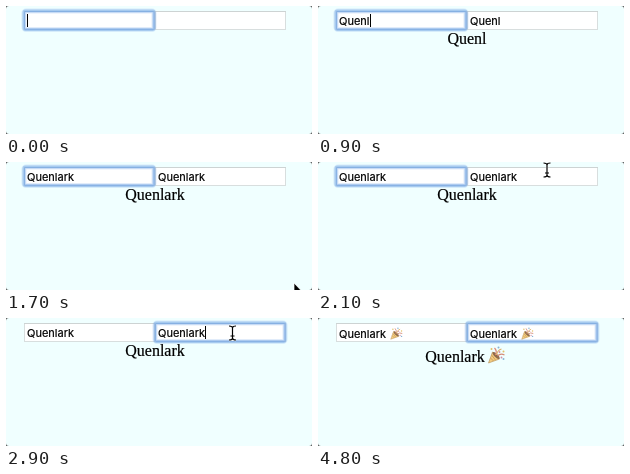
An HTML page for the animation above (5 s loop, 306x128 px).

```html
<!DOCTYPE html>
<html lang="en">
<head>
<meta charset="utf-8">
<title>Linked inputs</title>
<style>
  html, body { margin: 0; width: 100%; height: 100%; overflow: hidden; background: #555; }
  svg { display: block; }
  text { white-space: pre; fill: #000; stroke: #000; stroke-width: .2; }
  .value { font: 11px Inter, "Open Sans", sans-serif; }
  .title { font: 16px "Liberation Serif", "Noto Serif", serif; text-anchor: middle; }
  .ring rect { fill: none; stroke: #78aae6; }
</style>
</head>
<body>
<svg width="306" height="128" viewBox="0 0 306 128">
  <defs>
    <symbol id="popper" viewBox="0 0 18 18">
      <path d="M1 17 5 6Q10 8 12 13Z" fill="#f3cc80" stroke="#b08a52" stroke-width=".6"/>
      <path d="M4 9l4 5M3 12l3 3" stroke="#cfa05a"/>
      <ellipse cx="8.6" cy="9.5" rx="4.6" ry="1.7" transform="rotate(45 8.6 9.5)" fill="#8f6c4c"/>
      <g fill="none" stroke-width="1.2">
        <path d="M8 9Q10 5 7 2" stroke="#d98a7c"/>
        <path d="M9 9Q10 4 14 3" stroke="#dfb26a"/>
        <path d="M10 10Q13 7 17 9" stroke="#d58c78"/>
      </g>
      <g fill="#86b4d4"><circle cx="11" cy="1.6" r="1"/><circle cx="16" cy="13" r="1"/></g>
      <g fill="#e3c067"><circle cx="4" cy="3" r="1"/><circle cx="16" cy="5.6" r="1"/></g>
      <g fill="#cf8fa8"><circle cx="14" cy="11.5" r=".9"/><circle cx="12" cy="6" r=".9"/></g>
    </symbol>
    <g id="box">
      <rect x="18.5" y="5.5" width="130" height="18" fill="#fff" stroke="#d8dede"/>
      <path d="M18 5.5h131" stroke="#cdd3d3"/>
    </g>
  </defs>
  <rect width="306" height="128" rx="3" fill="#f0ffff"/>
  <use href="#box"/>
  <use href="#box" x="131"/>
  <g class="ring" id="ring">
    <rect x="18" y="5" width="130" height="18.5" rx="2" stroke-width="5" opacity=".22"/>
    <rect x="18" y="5" width="130" height="18.5" rx="1.5" stroke-width="3" opacity=".5"/>
    <rect x="18.5" y="5.5" width="129.5" height="18" rx="1" stroke-width="1" opacity=".55"/>
  </g>
  <text class="value" x="21"></text>
  <text class="value" x="152"></text>
  <text class="title" id="title"></text>
  <g id="party">
    <use href="#popper" x="72" y="9" width="13" height="13"/>
    <use href="#popper" x="203" y="9" width="13" height="13"/>
    <use href="#popper" x="169.5" y="28" width="18" height="18"/>
  </g>
  <rect id="caret" y="8" width="1" height="13"/>
  <path id="arrow" d="M0 0V11L2.6 8.6 4.3 12.4 6 11.6 4.3 8H7.6Z" stroke="#fff" stroke-width=".7"/>
  <g id="beam" fill="none">
    <path d="M-3.5-7Q0-7 0-5Q0-7 3.5-7M0-5V5M-3.5 7Q0 7 0 5Q0 7 3.5 7M-2 3H2" stroke="#fff" stroke-width="2.4" opacity=".8"/>
    <path d="M-3.5-7Q0-7 0-5Q0-7 3.5-7M0-5V5M-3.5 7Q0 7 0 5Q0 7 3.5 7M-2 3H2" stroke="#000" stroke-width="1.2"/>
  </g>
</svg>
<script>
const LOOP = 5000, WORD = "Quenlark";
const CLICK = 2900, SPACE = 3500, EMOJI = 4300;
// [time, letters typed so far]
const KEYS = [[0, 0], [300, 1], [600, 2], [700, 3], [900, 5], [1000, 6], [1100, 7], [1200, 8]];
const $ = id => document.getElementById(id);
const values = document.querySelectorAll(".value");
const show = (el, on) => el.setAttribute("visibility", on ? "visible" : "hidden");
const move = (el, x, y) => el.setAttribute("transform", `translate(${x} ${y})`);

function drawPointer(t) {
  const p = Math.min(Math.max((t - 1700) / 400, 0), 1);
  const e = p * p * (3 - 2 * p);
  let x = 288 - 59 * e, y = 121 - 113 * e;
  if (t >= 2200) [x, y] = t < 2300 ? [227.5, 12] : [226.5, 15];
  const visible = t >= 1700 && t < SPACE, overInput = y < 24;
  show($("arrow"), visible && !overInput);
  show($("beam"), visible && overInput);
  move($("arrow"), x, y);
  move($("beam"), x, y);
}

function draw(now) {
  const t = Math.floor(now % LOOP / 100) * 100;
  const count = KEYS.filter(k => k[0] <= t).pop()[1];
  const word = WORD.slice(0, count);
  const party = t >= EMOJI, second = t >= CLICK;

  // The emoji makes its line taller, so the text beside it sits lower
  for (const v of values) {
    v.textContent = word + (t >= SPACE ? " " : "");
    v.setAttribute("y", party ? 20 : 19);
  }
  $("title").textContent = word;
  $("title").setAttribute("x", party ? 137 : 149);
  $("title").setAttribute("y", party ? 44 : 38);
  show($("party"), party);
  move($("ring"), second ? 131 : 0, 0);

  // The caret blinks every 500 ms, restarting at each input event
  const last = [...KEYS.map(k => k[0]), CLICK, SPACE, EMOJI].filter(k => k <= t).pop();
  show($("caret"), (t - last) % 1000 < 500);
  const width = values[0].getComputedTextLength() + (party ? 15 : 0);
  $("caret").setAttribute("x", Math.round((second ? 152 : 21) + width));

  drawPointer(t);
}

const start = performance.now();
function tick() {
  draw(performance.now() - start);
  requestAnimationFrame(tick);
}
tick();
</script>
</body>
</html>
```
